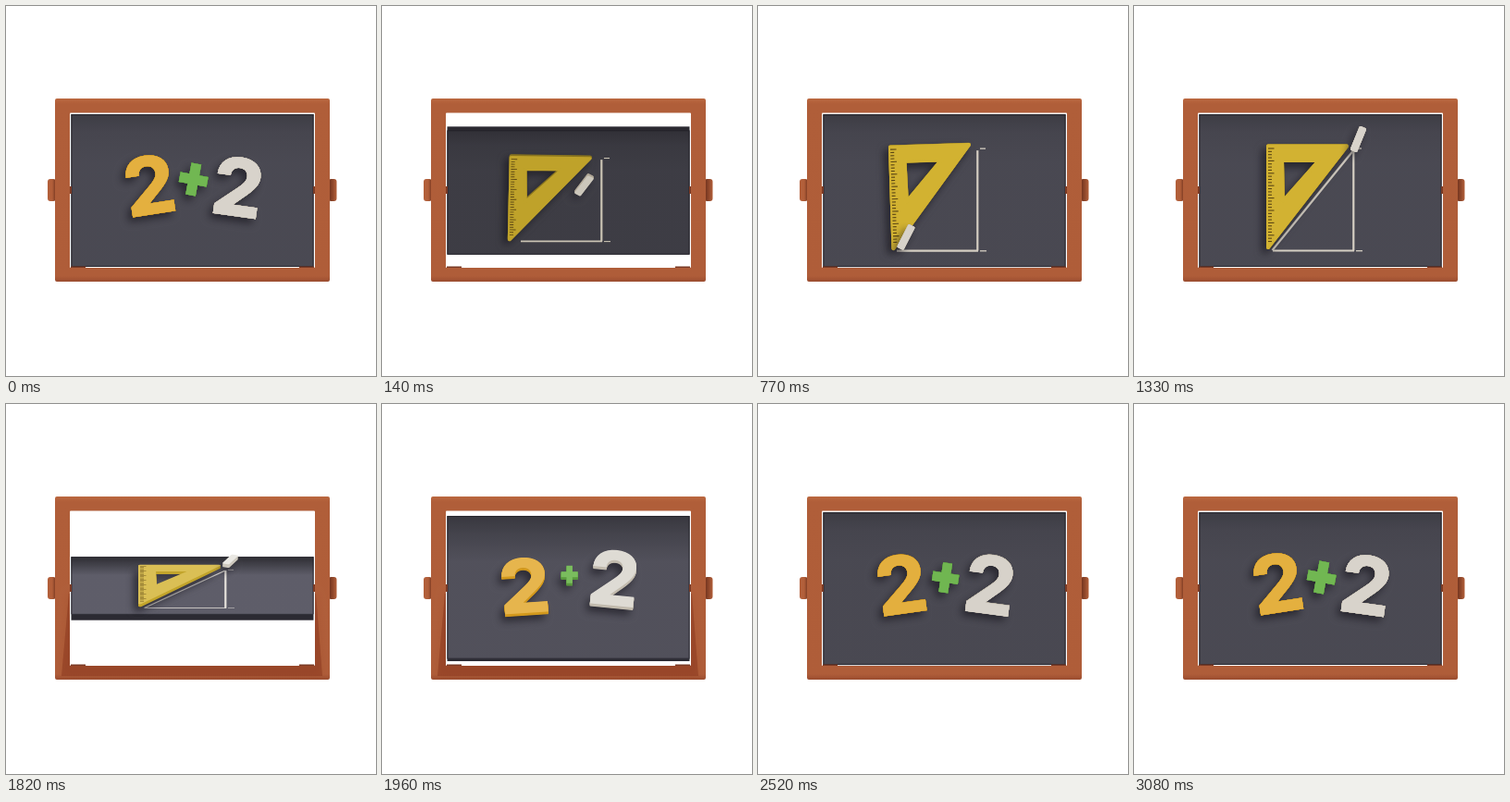
These frames come from a looping animation (400x400 px, 3.5 s). An HTML page with a canvas:

```html
<!DOCTYPE html>
<html lang="en">
<head>
<meta charset="utf-8">
<title>Flipping chalkboard</title>
<style>
html, body { margin: 0; width: 100%; height: 100%; overflow: hidden; background: #fff; }
canvas { display: block; width: 400px; height: 400px; }
</style>
</head>
<body>
<canvas></canvas>
<script>
const canvas = document.querySelector('canvas');
const ctx = canvas.getContext('2d');
const ratio = window.devicePixelRatio || 1;
canvas.width = canvas.height = 400 * ratio;

const LOOP = 3500, HALF = 1750, STEP = 70, SETTLED = 1330;
const MID = 199.5, BOARD_X = 70.5, BOARD_W = 262, BOARD_H = 165, THICK = 7;
const RAD = Math.PI / 180;
const YELLOW = [41, 75, 57], WHITE = [40, 14, 82], GREEN = [102, 41, 52], RULER = [48, 64, 51];

let tilt = 0; // radians, positive when the face looks upward

const mix = (a, b, k) => a + (b - a) * k;
const ease = (t, from, to) => {
  const x = Math.min(1, Math.max(0, (t - from) / (to - from)));
  return x * x * (3 - 2 * x);
};
const upward = () => Math.max(0, Math.sin(tilt));
const tone = ([h, s, l], shift = 0) => `hsl(${h} ${s}% ${l + shift + 9 * Math.sin(tilt)}%)`;

// Draw on a plane parallel to the board face, raised by z.
function onPlane(z, draw) {
  ctx.save();
  ctx.translate(0, MID - (THICK / 2 + z) * Math.sin(tilt));
  ctx.scale(1, Math.cos(tilt));
  ctx.translate(0, -MID);
  draw();
  ctx.restore();
}

// Stack layers of one shape to give it depth; the lowest casts the shadow.
function solid(color, from, to, draw) {
  for (let z = from; z <= to; z++) {
    onPlane(z, () => {
      if (z === from) {
        ctx.shadowColor = 'rgba(22,20,28,.65)';
        ctx.shadowBlur = 8 * ratio;
        ctx.shadowOffsetX = -4 * ratio;
        ctx.shadowOffsetY = 5 * ratio;
      }
      ctx.fillStyle = ctx.strokeStyle = tone(color, z < to ? -13 : 0);
      draw();
    });
  }
}

function place(x, y, deg, scale = 1) {
  ctx.translate(x, y);
  ctx.rotate(deg * RAD);
  ctx.scale(scale, scale);
}

function line(x1, y1, x2, y2) {
  ctx.beginPath();
  ctx.moveTo(x1, y1);
  ctx.lineTo(x2, y2);
  ctx.stroke();
}

function poly(...p) {
  ctx.moveTo(p[0], p[1]);
  for (let i = 2; i < p.length; i += 2) ctx.lineTo(p[i], p[i + 1]);
  ctx.closePath();
}

function digit(color, x, y, deg) {
  solid(color, 0, 8, () => {
    place(x, y, deg);
    ctx.font = '800 87px Inter, sans-serif';
    ctx.textAlign = 'center';
    ctx.fillText('2', 0, 32);
  });
}

function sumFace(t) {
  const k = Math.min(1, Math.exp((210 - t) / 350));
  digit(YELLOW, 155 - k, 193 + 7 * k, -9 + 5 * k);
  digit(WHITE, 251, 195.5 - 4 * k, 8 - 2 * k);
  solid(GREEN, 0, 8, () => {
    place(202.7, 187.5, 11 * (1 - k), 1 - 0.42 * k);
    ctx.beginPath();
    ctx.rect(-5.5, -17.5, 11, 35);
    ctx.rect(-15.5, -5.5, 31, 11);
    ctx.fill();
  });
}

function setSquare(t) {
  const away = 1 - ease(t, 420, 860);
  const turn = mix(mix(1, -1.8, ease(t, 420, 700)), 0, ease(t, 770, 1120));
  const pose = () => {
    place(175 - 6 * away, 195 - away, turn);
    ctx.translate(-175, -195);
  };
  solid(RULER, 1, 4, () => {
    pose();
    ctx.lineJoin = 'round';
    ctx.lineWidth = 4;
    ctx.beginPath();
    poly(145, 151.5, 230, 151.5, 145, 261);
    poly(160, 167, 200, 167, 161, 211);
    ctx.fill('evenodd');
    ctx.stroke();
  });
  onPlane(4, () => {
    pose();
    ctx.strokeStyle = '#5b4614';
    ctx.lineWidth = 1.1;
    for (let i = 0; i < 31; i++) {
      const y = 154 + i * 3.35;
      line(145, y, i % 4 ? 149 : 151.5, y);
    }
  });
}

function drawingFace(t) {
  const reach = ease(t, 420, 770), drawn = ease(t, 770, 1240);
  onPlane(0, () => {
    ctx.strokeStyle = tone([40, 18, 80]);
    ctx.lineWidth = 2.2;
    line(150, 264.5, 238, 264.5);
    line(237.3, 156, 237.3, 264.5);
    if (drawn > 0) line(149.5, 264, mix(149.5, 236.5, drawn), mix(264, 157, drawn));
    ctx.lineWidth = 1.3;
    line(240, 154, 246, 154);
    line(240, 264.7, 247, 264.7);
  });
  setSquare(t);
  solid(WHITE, 4, 8, () => {
    place(
      mix(mix(218.5, 160, reach), 242.5, drawn),
      mix(mix(185, 249.5, reach), 144, drawn),
      mix(mix(32, 27, reach), 22, drawn)
    );
    ctx.beginPath();
    ctx.roundRect(-4, -14, 8, 28, 1.5);
    ctx.fill();
  });
}

function board() {
  const lift = THICK * Math.sin(tilt), h = BOARD_H * Math.cos(tilt);
  ctx.fillStyle = '#2b2a32';
  ctx.fillRect(BOARD_X, MID - h / 2 - Math.abs(lift) / 2, BOARD_W, h + Math.abs(lift));
  onPlane(0, () => {
    const top = MID - BOARD_H / 2;
    const g = ctx.createLinearGradient(0, top, 0, top + BOARD_H);
    const slate = [245, 6, 30.5];
    g.addColorStop(0, tone(slate, -5 - 16 * upward()));
    g.addColorStop(0.12, tone(slate, -1.5 - 12 * upward()));
    g.addColorStop(0.32, tone(slate));
    g.addColorStop(1, tone(slate));
    ctx.fillStyle = g;
    ctx.fillRect(BOARD_X, top, BOARD_W, BOARD_H);
    ctx.strokeStyle = 'rgba(20,18,24,.6)';
    ctx.lineWidth = 1;
    ctx.strokeRect(BOARD_X + 0.5, top + 0.5, BOARD_W - 1, BOARD_H - 1);
  });
}

function knob(x, from, to, stop) {
  const g = ctx.createLinearGradient(x, 0, x + 9, 0);
  g.addColorStop(0, from);
  g.addColorStop(stop, from);
  g.addColorStop(1, to);
  ctx.fillStyle = g;
  ctx.beginPath();
  ctx.roundRect(x, 187, 9, 24, 3);
  ctx.fill();
}

function frame() {
  knob(45, '#b25f3a', '#74351f', 0.55);
  knob(348.5, '#74351f', '#b25f3a', 0.15);
  ctx.fillStyle = '#7a3a25';
  ctx.fillRect(68, 195, 3, 8);
  ctx.fillRect(332, 195, 3, 8);
  ctx.fillRect(70, 281.5, 16, 2);
  ctx.fillRect(317, 281.5, 16, 2);

  const g = ctx.createLinearGradient(0, 100, 0, 298);
  g.addColorStop(0, '#bb6840');
  g.addColorStop(0.03, '#b05e39');
  g.addColorStop(0.97, '#af5d39');
  g.addColorStop(1, '#9a4c2f');
  ctx.fillStyle = g;
  ctx.beginPath();
  ctx.roundRect(53, 100, 297, 198, 2);
  ctx.roundRect(69, 115.5, 265, 167.5, 1);
  ctx.fill('evenodd');

  // Shade thrown on the lower bars by a board facing upward.
  ctx.save();
  ctx.clip('evenodd');
  ctx.shadowColor = ctx.fillStyle = `rgba(120,38,18,${Math.min(0.35, upward())})`;
  ctx.shadowBlur = 8 * ratio;
  ctx.beginPath();
  poly(68, 205, 335, 205, 342, 294, 60, 294);
  ctx.fill();
  ctx.restore();
}

function render(now) {
  const time = Math.floor((now % LOOP) / STEP) * STEP;
  const t = Math.min(time % HALF, SETTLED);
  const toDrawing = time < HALF;

  // Damped spring: half a turn, swinging past and settling.
  const swing = Math.exp(-t / 255) * Math.cos(t / 360 * Math.PI) * (1 - ease(t, 500, 900));
  const angle = Math.PI * (1 - swing);
  const flipped = Math.cos(angle) < 0;
  tilt = flipped ? angle - Math.PI : angle;

  ctx.setTransform(ratio, 0, 0, ratio, 0, 0);
  ctx.fillStyle = '#fff';
  ctx.fillRect(0, 0, 400, 400);
  board();
  (flipped === toDrawing ? drawingFace : sumFace)(flipped ? t : SETTLED);
  frame();
}

const start = performance.now();
function tick() {
  render(performance.now() - start);
  requestAnimationFrame(tick);
}
tick();
</script>
</body>
</html>
```
